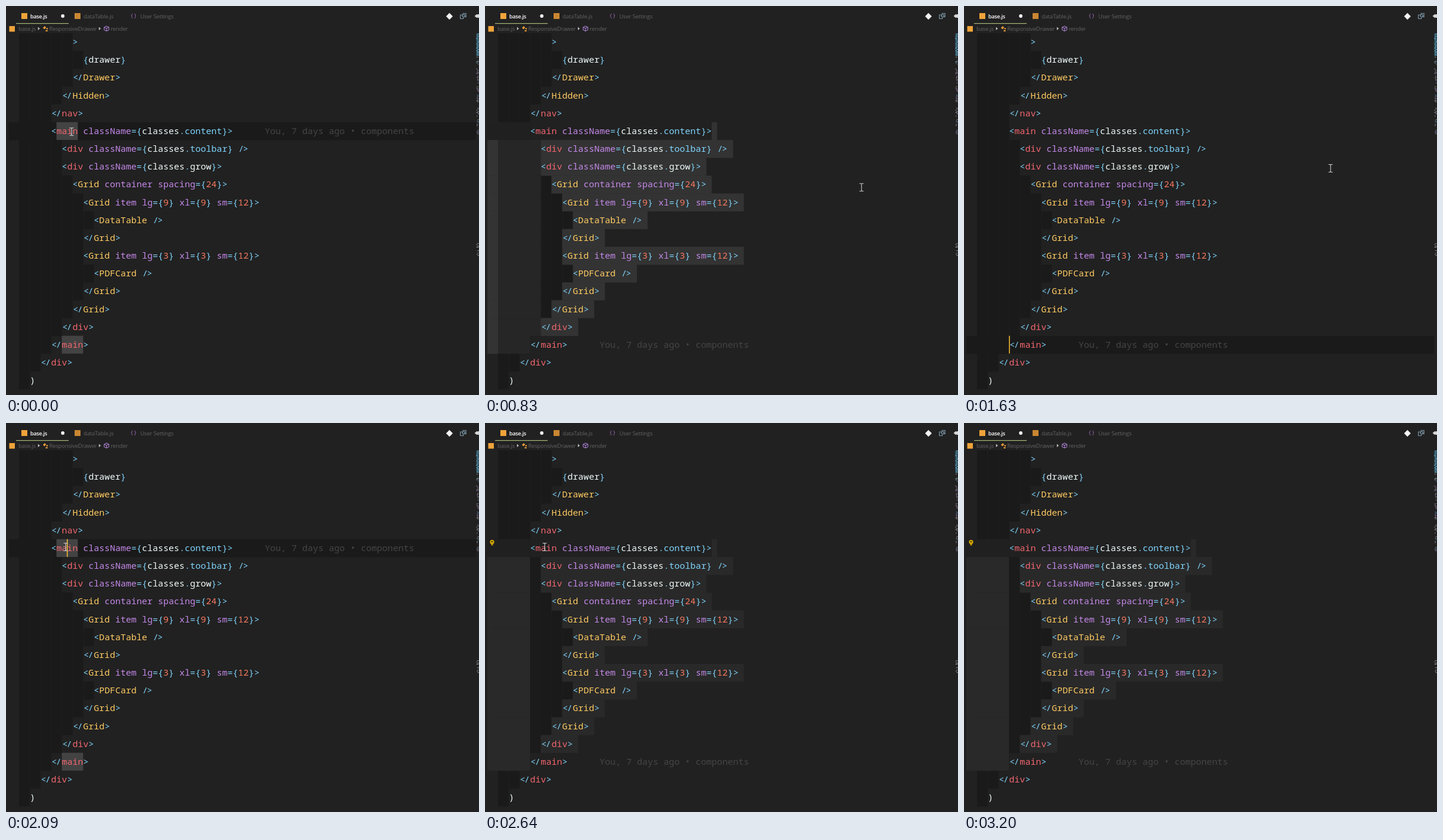
Recreate the animation shown at these times as an HTML page. Size 800 by 659 pixels, loop 3240 ms.

```html
<!DOCTYPE html>
<html lang="en">
<head>
<meta charset="utf-8">
<title>Editor: balance tags</title>
<style>
  html, body { margin: 0; width: 100%; height: 100%; overflow: hidden; background: #212121; }
  svg { display: block; }
  text { white-space: pre; }
  .code { font: 500 15.06px "Noto Sans Mono", "DejaVu Sans Mono", monospace; }
  .ui { font: 9.7px "Open Sans", "Noto Sans", sans-serif; letter-spacing: -.23px; fill: #626262; }
  .ui.on, .row.on { font-size: 9.4px; font-weight: 600; letter-spacing: -.36px; color: #fff; fill: #fff; }
  .row { position: absolute; left: 0; width: 440px; height: 16.58px; box-sizing: border-box;
         padding: 0 5px 0 8px; display: flex; align-items: center; white-space: pre;
         font: 9.7px/16px "Open Sans", "Noto Sans", sans-serif; letter-spacing: -.23px; color: #626262; }
  .row .name { flex: 1; }
  .row svg { display: inline-block; vertical-align: -1px; }
  .key { font-size: 8.6px; font-weight: 400; letter-spacing: -.2px; line-height: 12px; padding: 0 3.5px;
         background: #2c2c2c; color: #dcdcdc; border-radius: 2px; }
  .plus { font-size: 8.6px; width: 7px; text-align: center; }
  .gap { width: 3px; }
  .recent { color: #c6f000; font-weight: 500; font-size: 9.9px; letter-spacing: -.23px; margin: 0 -2px 0 6px; }
</style>
</head>
<body>
<svg id="stage" width="100%" height="100%" viewBox="0 0 800 659">
  <rect width="800" height="659" fill="#212121"/>
  <g id="indent"></g>
  <g id="marks"></g>
  <g id="code" class="code"></g>
  <text id="blame" class="code" fill="#454545">You, 7 days ago • components</text>
  <rect id="caret" width="1.5" height="30" fill="#ffc233"/>
  <g id="minimap"></g>

  <g id="bulb" fill="none" stroke="#e8b500" stroke-width="1.6">
    <circle cx="12" cy="201.5" r="2.8" fill="#6b5500"/>
    <path d="M12 202v5M10.5 206.5h3"/>
  </g>

  <g id="header">
    <rect x="26" y="12" width="10" height="10" fill="#f0a33a"/>
    <text class="ui on" x="41" y="20.5">base.js</text>
    <circle cx="96" cy="17" r="2.9" fill="#f2f2f2"/>
    <rect x="17" y="29" width="89" height="1.2" fill="#a9b878"/>
    <rect x="116" y="12" width="10" height="10" fill="#c98632"/>
    <text class="ui" x="131" y="20.5">dataTable.js</text>
    <text class="ui" x="211" y="19.5" style="fill:#a06cc0">{ }</text>
    <text class="ui" x="227" y="20.5">User Settings</text>
    <rect x="5.5" y="34" width="9.5" height="9.5" fill="#f0a33a"/>
    <text class="ui" x="21" y="41.5">base.js</text>
    <path d="M54 35.5l3.5 2.8-3.5 2.8zM157 35.5l3.5 2.8-3.5 2.8z" fill="#b5b5b5"/>
    <path d="M62.5 37l3-3 2.5 2.5-3 3zM68 37.5h3v2h-3zM67 41h3.5v2h-3.5z" fill="#e59a3c"/>
    <text class="ui" x="73" y="41.5">ResponsiveDrawer</text>
    <path d="M170 34l4 2v4.5l-4 2-4-2v-4.5zM166 36l4 2 4-2M170 38v4" fill="none" stroke="#a97fd0" stroke-width="1.1"/>
    <text class="ui" x="177" y="41.5">render</text>
    <rect x="746" y="13.5" width="8" height="8" fill="#f4f4f4" transform="rotate(45 750 17.5)"/>
    <g fill="none" stroke="#7d98a8" stroke-width="1.2">
      <path d="M772 12.5h6v6h-2M773 15h-4.5v6.5h5v-2"/>
      <circle cx="774" cy="16.5" r="2.2"/>
    </g>
    <path d="M792.5 17l4-3.5v7zM796 17a3 3 0 0 1 6 0 3 3 0 0 1-6 0" fill="#d8d8d8"/>
  </g>

  <g id="tip">
    <rect x="85.5" y="101.5" width="377" height="97" fill="#212121" stroke="#3a3a3a" stroke-dasharray="1 1"/>
    <g id="tipText" class="code"></g>
  </g>

  <g id="palette">
    <rect x="353" y="8" width="450" height="364" fill="#000" opacity=".18"/>
    <rect x="356" y="8" width="450" height="361" fill="#212121"/>
    <rect x="360" y="9" width="440" height="18" fill="#2a2a2a"/>
    <text class="ui on" x="364" y="21.5">&gt;</text>
    <rect x="370" y="11" width="1" height="14" fill="#eee"/>
    <rect x="356" y="32" width="444" height="16" fill="#3c3c3c"/>
    <foreignObject x="356" y="0" width="444" height="372"><div id="rows" xmlns="http://www.w3.org/1999/xhtml"></div></foreignObject>
  </g>

  <g id="beam" fill="none" stroke="#d0d0d0" stroke-width="1.1">
    <path d="M-3.5-6.5h2.5l1 1 1-1h2.5M0-5.5v11M-3.5 6.5h2.5l1-1 1 1h2.5"/>
  </g>
  <g id="hand">
    <path transform="scale(1.12)" fill="#fff" stroke="#222" stroke-width=".6"
      d="M-4-8c0-2.5 3.2-2.5 3.2 0v5c1-1.2 2.8-.8 3 .3 1-.9 2.6-.4 2.8.7 1-.6 2.6 0 2.6 1.6v5c0 2-1.4 3-1.6 6h-7.5c-.5-3-4.500-5.500-6-9-.6-1.800 1.400-2.500 2.400-1.200l1.100 1.500z"/>
  </g>
</svg>
<script>
const LOOP = 3240, CW = 9.036, LH = 30.16, X0 = 4, TOP = 46, BASE = 20.1;
const NS = "http://www.w3.org/2000/svg";
const C = { cyan: "#7fd4fc", red: "#f2666f", yellow: "#ffcb62", purple: "#c589ea", num: "#f7795f", white: "#f0fbfb" };
const $ = id => document.getElementById(id);
const colX = c => X0 + c * CW;
const rowY = r => TOP + r * LH;

function add(parent, tag, attrs, text) {
  const el = document.createElementNS(NS, tag);
  for (const k in attrs) el.setAttribute(k, attrs[k]);
  if (text) el.textContent = text;
  parent.appendChild(el);
  return el;
}
const box = (parent, x, y, w, h, fill) => add(parent, "rect", { x, y, width: w, height: h, fill });

const lines = [
  [12, ">"], [14, "{drawer}"], [12, "</Drawer>"], [10, "</Hidden>"], [8, "</nav>"],
  [8, "<main className={classes.content}>"],
  [10, "<div className={classes.toolbar} />"],
  [10, "<div className={classes.grow}>"],
  [12, "<Grid container spacing={24}>"],
  [14, "<Grid item lg={9} xl={9} sm={12}>"], [16, "<DataTable />"], [14, "</Grid>"],
  [14, "<Grid item lg={3} xl={3} sm={12}>"], [16, "<PDFCard />"], [14, "</Grid>"],
  [12, "</Grid>"], [10, "</div>"], [8, "</main>"], [6, "</div>"], [4, ")"], [2, "}"]
];
const OPEN = 5, CLOSE = 17;

function tokenColor(tok, prev) {
  if (/^\d/.test(tok)) return C.num;
  if (tok === ")") return C.white;
  if (!/^\w/.test(tok)) return C.cyan;
  if (prev[0] === "<") return /^[A-Z]/.test(tok) ? C.yellow : C.red;
  if (prev === "{" || tok === "grow") return C.white;
  return prev === "." ? C.cyan : C.purple;
}

function drawLine([col, src], r) {
  const y = rowY(r) + BASE;
  let prev = "";
  for (const m of src.matchAll(/<\/|\/>|\d+|\w+|[^\s]/g)) {
    const tok = m[0], x = colX(col + m.index), fill = tokenColor(tok, prev);
    if (tok === "</" || tok === "/>") {
      // Tag brackets join into a tighter pair
      add($("code"), "text", { x: x + .8, y, fill }, tok[0]);
      add($("code"), "text", { x: x + CW - .8, y, fill }, tok[1]);
    } else {
      add($("code"), "text", { x, y, fill }, tok);
    }
    prev = tok;
  }
  const edge = colX(col);
  if (col > 2) box($("indent"), colX(2), rowY(r), edge - colX(2), LH + .3, "#1a1a1a");
  for (let c = 4; c < col; c += 2) box($("indent"), Math.round(colX(c)), rowY(r), 1, LH + .3, "#1e1e1e");
}
lines.forEach(drawLine);

// Background layers for each editor state
function layer() { return add($("marks"), "g", {}); }
function currentLine(g, r) { box(g, 4.5, rowY(r) + .3, 790.5, LH, "#1a1a1a"); }

const marks = { main: layer(), end: layer(), sel: layer(), dim: layer() };
currentLine(marks.main, OPEN);
box(marks.main, colX(9), rowY(OPEN), 4 * CW, LH, "#434343");
box(marks.main, colX(10), rowY(CLOSE), 4 * CW, LH, "#434343");
currentLine(marks.end, CLOSE);

function selection(g, bright, shade, shadeFrom, shadeTo) {
  box(g, 4, rowY(OPEN), colX(8) - 4, LH, "#202020");
  box(g, colX(8 + lines[OPEN][1].length), rowY(OPEN), CW, LH, bright);
  for (let r = OPEN + 1; r <= CLOSE; r++) {
    const [col, src] = lines[r], y = rowY(r), h = LH + .3;
    const stop = colX(Math.min(col, shadeTo));
    box(g, 4, y, colX(shadeFrom) - 4, h, bright);
    if (stop > colX(shadeFrom)) box(g, colX(shadeFrom), y, stop - colX(shadeFrom), h, shade);
    if (r < CLOSE) box(g, colX(col), y, (src.length + 1) * CW, h, bright);
  }
}
selection(marks.sel, "#333333", "#262626", 2, 10);
selection(marks.dim, "#292929", "#1b1b1b", 8, 10);

// Minimap sliver at the right edge
let seed = 7;
const rnd = () => (seed = (seed * 16807) % 2147483647) / 2147483647;
function mini(from, to, density, colors) {
  for (let y = from; y < to; y += 2) {
    if (rnd() > density) continue;
    const x = 795 + rnd() * 2.5;
    box($("minimap"), x, y, 1.5 + rnd() * 3, 1, colors[Math.floor(rnd() * colors.length)]);
  }
}
box($("minimap"), 795, 46, 5, 38, "#2b4550");
mini(47, 84, 1, ["#6cb4d4", "#5a94ad"]);
mini(86, 222, .72, ["#777", "#999", "#4d7f96", "#8d6ba5", "#666"]);
mini(402, 424, .8, ["#aaa", "#888", "#777"]);

// Hover tooltip
[
  [["(property) ", C.white], ["JSX", C.red], [".IntrinsicElements.main: R", C.white]],
  [["eact.DetailedHTMLProps<React.HTMLAttribu", C.white]],
  [["tes<", C.white], ["HTMLElement", C.yellow], [">, ", C.white], ["HTMLElement", C.yellow], [">", C.white]]
].forEach((parts, i) => {
  let n = 0;
  for (const [s, fill] of parts) {
    add($("tipText"), "text", { x: 89 + n * CW, y: 125 + i * 30, fill }, s);
    n += s.length;
  }
});

// Command palette
const camera = '<svg width="10" height="8"><path d="M0 1h10v6H0z" fill="#c9b458"/><path d="M1 0h8v1.5H1z" fill="#7f8f4a"/><path d="M3 3h4v3H3z" fill="#34332a"/></svg>';
const tools = '<svg width="9" height="9"><path d="M1 8l6-6M2 2l6 6M.5 3l2.5-2.5" stroke="#777" stroke-width="1.5" fill="none"/></svg>';
const commands = [
  ["Emmet: Balance (outward)", "Ctrl+Shift+UpArrow"],
  ["Emmet: Balance (inward)", "Ctrl+Shift+DownArrow"],
  ["Emmet: Wrap Individual Lines with Abbreviation"],
  ["Emmet: Wrap with Abbreviation", "Shift+Alt+;"],
  ["Preferences: Open Keyboard Shortcuts", "Ctrl+K Ctrl+S"],
  ["Wrap selected text"],
  ["Velpin.js: New JavaScript File", "Ctrl+K J"],
  ["Reload Window"],
  ["DoruTick API Key"],
  ["DoruTick Dashboard"],
  ["npm: Run Script", "Ctrl+R Shift+R"],
  ["Polacode " + camera],
  ["Terminal: Run Active File In Active Terminal"],
  ["Velpin.js: Start on Current File", "Ctrl+K Q"],
  ["Python: Run Python File in Terminal"],
  ["Live Server: Open with Live Server", "Alt+L Alt+O"],
  ["Extensions: Install Extensions"],
  ["Reload Window With Extensions Disabled"],
  [tools + " Material Theme: Fix file icons"],
  ["Preferences: Color Theme", "Ctrl+K Ctrl+T"]
];
const chord = s => s.split("+").map(k => `<span class="key">${k}</span>`).join('<span class="plus">+</span>');
$("rows").innerHTML = commands.map(([name, keys = ""], i) => {
  const on = i === 0 || i === commands.length - 1 ? " on" : "";
  const chips = keys && keys.split(" ").map(chord).join('<span class="gap"></span>');
  const recent = i ? "" : '<span class="recent">recently used</span>';
  return `<div class="row${on}" style="top:${(31.7 + i * 16.58).toFixed(2)}px"><span class="name">${name}</span>${chips}${recent}</div>`;
}).join("");

// Timeline: start time, editor state, extras
const steps = [
  [0, "main", ""], [260, "main", "palette"], [700, "sel", ""], [1480, "end", "caret"],
  [1930, "main", "caret"], [2230, "main", "tip"], [2490, "main", "palette"],
  [2620, "dim", "bulb"], [2740, "main", "caret"], [2900, "main", "palette"], [3120, "dim", "bulb"]
];
const path = [
  [0, 111, 213], [40, 111, 213], [420, 658, 348], [680, 658, 348], [960, 620, 275],
  [1670, 620, 275], [1900, 101, 210], [2740, 101, 210], [2800, 147, 229], [3020, 640, 330], [LOOP, 640, 330]
];

function mouseAt(t) {
  const i = path.findIndex(p => p[0] > t);
  const [t0, x0, y0] = path[i - 1], [t1, x1, y1] = path[i];
  const u = (t - t0) / (t1 - t0), k = u * u * (3 - 2 * u);
  return [x0 + (x1 - x0) * k, y0 + (y1 - y0) * k];
}
const show = (el, on) => el.setAttribute("visibility", on ? "visible" : "hidden");

function render(t) {
  const [, state, extra] = steps.filter(s => s[0] <= t).pop();
  for (const k in marks) show(marks[k], k === state);
  for (const id of ["palette", "tip", "caret", "bulb"]) show($(id), extra === id);

  const row = state === "main" ? OPEN : CLOSE;
  const [col, src] = lines[row];
  $("blame").setAttribute("x", colX(col + src.length + 6));
  $("blame").setAttribute("y", rowY(row) + BASE);
  $("caret").setAttribute("x", state === "main" ? colX(11) - .5 : colX(8) - .3);
  $("caret").setAttribute("y", rowY(row));

  const [x, y] = mouseAt(t);
  const visible = t < 3120;
  const overList = extra === "palette" && x > 356 && y < 369;
  for (const id of ["beam", "hand"]) {
    $(id).setAttribute("transform", `translate(${x.toFixed(1)} ${y.toFixed(1)})`);
    show($(id), visible && (id === "hand") === overList);
  }
}

const start = performance.now();
function tick(now) {
  render(Math.max(0, now - start) % LOOP);
  requestAnimationFrame(tick);
}
render(0);
requestAnimationFrame(tick);
</script>
</body>
</html>
```
